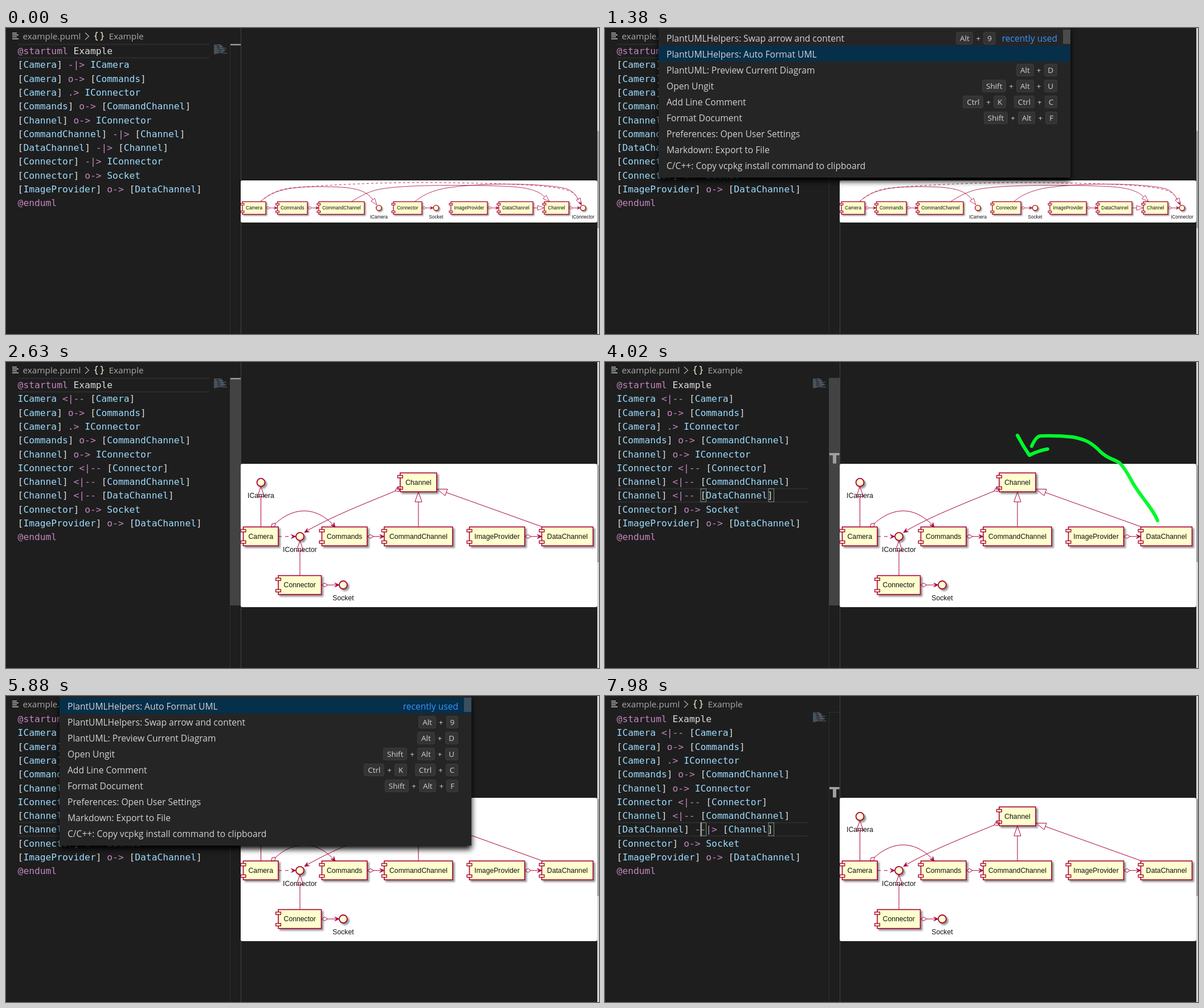
An HTML page for the animation above (8000 ms loop, 1041 by 538 pixels).

```html
<!DOCTYPE html>
<html lang="en">
<head>
<meta charset="utf-8">
<title>Component diagram editor</title>
<style>
  html, body { margin: 0; width: 100%; height: 100%; overflow: hidden; background: #1e1e1e; }
  #stage { position: absolute; left: 0; top: 0; width: 1041px; height: 538px; overflow: hidden; }
  svg { position: absolute; left: 0; top: 0; display: block; }
  .code text { font: 16.28px "DejaVu Sans Mono", monospace; white-space: pre; }
  .crumb { font: 15.3px "Open Sans", sans-serif; fill: #a9a9a9; }
  .label { font-family: "Liberation Sans", Arial, sans-serif; text-anchor: middle; fill: #111; }
  .wire { fill: none; stroke: #a80036; }
  .wire path { vector-effect: non-scaling-stroke; }
  .head { fill: #a80036; }
  .part { fill: #fefece; stroke: #a80036; }
  .tab { fill: #fefece; stroke: #a80036; }
  #flat .part { filter: drop-shadow(2.3px 2.3px 1.1px rgba(0,0,0,.42)); }
  #layered .part { filter: drop-shadow(3.4px 3.4px 1.6px rgba(0,0,0,.42)); }
  #palette { position: absolute; left: 94px; top: 0; width: 723px; height: 263px; background: #252526;
    box-shadow: 0 6px 10px #000; color: #d2d2d2; font: 15.6px "Open Sans", sans-serif; }
  .row { position: absolute; left: 0; width: 686px; height: 27.1px; padding: 1px 23px 0 14px;
    display: flex; align-items: center; white-space: nowrap; }
  .row.on { background: #062f4a; }
  .name { flex: 1; }
  .keys { display: flex; align-items: center; font-size: 13.5px; }
  .key { box-sizing: border-box; height: 22px; line-height: 20px; padding: 0 5.8px; border-radius: 4px;
    background: rgba(128,128,128,.17); border: 1px solid rgba(128,128,128,.1); }
  .plus { width: 18px; text-align: center; }
  .gap { width: 14px; }
  .recent { color: #3794ff; margin-left: 11px; }
  #thumb { position: absolute; left: 710px; top: 3px; width: 13px; height: 25px; background: rgba(121,121,121,.45); }
</style>
</head>
<body>
<div id="stage">
  <svg id="scene" width="1041" height="538" viewBox="0 0 1041 538"></svg>
  <div id="palette"></div>
</div>
<script>
const LOOP = 8000, LEFT = 20.6, TOP = 28.4, PITCH = 24.27, CHAR = 9.8;
const $ = id => document.getElementById(id);

// ---- source text ----
const before = [
  '@startuml Example', '[Camera] -|> ICamera', '[Camera] o-> [Commands]', '[Camera] .> IConnector',
  '[Commands] o-> [CommandChannel]', '[Channel] o-> IConnector', '[CommandChannel] -|> [Channel]',
  '[DataChannel] -|> [Channel]', '[Connector] -|> IConnector', '[Connector] o-> Socket',
  '[ImageProvider] o-> [DataChannel]', '@enduml'];
const sorted = before.slice();
sorted[1] = 'ICamera <|-- [Camera]';
sorted[6] = 'IConnector <|-- [Connector]';
sorted[7] = '[Channel] <|-- [CommandChannel]';
sorted[8] = '[Channel] <|-- [DataChannel]';
const swapped = sorted.slice();
swapped[8] = '[DataChannel] --|> [Channel]';

const escape = s => s.replace(/</g, '&lt;').replace(/>/g, '&gt;');
const tokens = line => [...line.matchAll(/(@\w+|o->|[-.<|>]+)|([\[\]])|(\w+)|\s+/g)].map(m => ({
  text: m[0], at: m.index,
  color: m[1] ? '#c586c0' : m[3] && m[0] !== 'Example' ? '#9cdcfe' : '#dcdcdc'
}));

function codeView(id, lines) {
  const rows = lines.map((line, i) => `<text x="${LEFT}" y="${46.2 + PITCH * i}">` +
    tokens(line).map(t => `<tspan fill="${t.color}">${escape(t.text)}</tspan>`).join('') + '</text>');
  const mini = lines.map((line, i) => tokens(line).filter(t => t.text.trim()).map(t =>
    `<rect x="${365 + t.at * .7}" y="${29 + i * 1.45}" width="${t.text.length * .7}" height="1" fill="${t.color}" opacity=".42"/>`
  ).join(''));
  return `<g id="${id}" class="code">${rows.join('')}${mini.join('')}</g>`;
}

// ---- diagram pieces, s is the zoom of the drawing ----
function kit(s, line) {
  const put = (x, y, deg, d, cls = '') =>
    `<path class="${cls}" d="${d}" stroke-width="${line}" transform="translate(${x} ${y}) rotate(${deg}) scale(${s})"/>`;
  const k = {
    text: (x, y, t) => `<text class="label" x="${x}" y="${y}" font-size="${14 * s}">${t}</text>`,
    head: (x, y, deg = 0) => put(x, y, deg, 'M0 0L-9-4L-5 0L-9 4Z', 'head'),
    tri: (x, y, deg = 0) => put(x, y, deg, 'M0 0L-20-7V7Z'),
    gem: (x, y, deg = 0) => put(x, y, deg, 'M0 0L6-4L12 0L6 4Z'),
    line: (d, dash = '') => `<path d="${d}" stroke-width="${line}" stroke-dasharray="${dash}"/>`,
    box(x, x2, y, name) {
      const h = 38 * s, w = 10 * s, t = 5 * s, sw = line * 1.6;
      const tab = ty => `<rect class="tab" x="${x - w / 2}" y="${ty}" width="${w}" height="${t}" stroke-width="${sw * .85}"/>`;
      return `<rect class="part" x="${x}" y="${y}" width="${x2 - x}" height="${h}" stroke-width="${sw}"/>` +
        tab(y + t) + tab(y + h - 2 * t) + k.text((x + x2) / 2, y + h / 2 + 4.9 * s, name);
    },
    port: (x, y, name) => `<circle class="part" cx="${x}" cy="${y}" r="${8 * s}" stroke-width="${line * 1.8}"/>` +
      k.text(x, y + 31.5 * s, name),
    link: (x, x2, y) => k.gem(x, y) + k.line(`M${x + 12 * s} ${y}H${x2 - 4 * s}`) + k.head(x2, y)
  };
  return k;
}

const sheet = (y, h) => `<rect x="412" y="${y}" width="626" height="${h}" rx="3" fill="#fff"/>`;

function flatDiagram() {
  const k = kit(.582, .8), y = 305.4, m = 316.3;
  const boxes = [[415, 456, 'Camera'], [476.5, 529, 'Commands'], [549, 629, 'CommandChannel'], [680, 730, 'Connector'],
    [781, 845, 'ImageProvider'], [865, 925, 'DataChannel'], [945, 988, 'Channel']];
  const links = [[456.5, 476], [529.5, 549], [730.5, 750], [845.5, 865], [988, 1008]];
  return sheet(268, 74) +
    boxes.map(b => k.box(b[0], b[1], y, b[2])).join('') +
    k.port(654.5, m, 'ICamera') + k.port(755, m, 'Socket') + k.port(1013, m, 'IConnector') +
    '<g class="wire">' + links.map(l => k.link(l[0], l[1], m)).join('') +
    k.line(`M925 ${m}H933.5`) + k.tri(945, m) +
    k.line('M447 305C470 284 500 279 550 279C600 279 630 281 644 302') + k.tri(651, 311, 53) +
    k.line('M447 305C465 289 480 284 502 281C630 271 720 271 800 272.5C900 274 980 277 997 291Q1003 297 1008 309', '4 4') +
    k.line('M607 305C625 294 640 285 665 282C720 274 860 276 900 280C925 283 938 289 945.5 297') + k.tri(954, 305, 43) +
    k.line('M718 305C735 290 760 282 790 279C850 272 950 273 985 283Q998 288 1004 300.5') + k.tri(1010, 311, 62) +
    k.head(1010, 311, 62) + '</g>';
}

function layeredDiagram() {
  const k = kit(.873, 1), m = 306.8;
  const boxes = [[692, 756, 195, 'Channel'], [416.5, 478, 290, 'Camera'], [554.5, 634, 290, 'Commands'],
    [664, 784, 290, 'CommandChannel'], [813.5, 910.5, 290, 'ImageProvider'], [940.5, 1030.5, 290, 'DataChannel'],
    [478, 553.5, 375.5, 'Connector']];
  const links = [[634.5, 664, m], [911, 940.5, m], [554, 585, 392]];
  return sheet(179, 252) +
    boxes.map(b => k.box(...b)).join('') +
    k.port(447.5, 211.7, 'ICamera') + k.port(516, m, 'IConnector') + k.port(592, 392, 'Socket') +
    '<g class="wire">' + links.map(l => k.link(...l)).join('') +
    k.tri(447.5, 219, -90) + k.line('M447.5 236.5V290') +
    k.tri(516, 314.5, -90) + k.line('M516 332V375') +
    k.tri(724, 228.5, -90) + k.line('M724 246V290') +
    k.tri(756.5, 223.5, 199.5) + k.line('M773 229.4L942 290') +
    k.line(`M478 ${m}H503`, '6 6') + k.head(508.5, m) +
    k.gem(465.5, 290.5, -42) + k.line('M473.5 283.5C505 255 543 253 575 287') + k.head(578, 290.5, 50) +
    k.gem(692.5, 222, 152) + k.line('M683 227C630 249 575 270 528 297') + k.head(524, 299.5, 150) + '</g>';
}

// ---- static scene ----
const frameLines = y => `<path d="M21 ${y}H357M21 ${y + 23.6}H357" stroke="#2c2c2c" stroke-width="2"/>`;
const charBox = x => `<rect x="${x}" y="222.8" width="9.6" height="23" fill="rgba(0,100,0,.1)" stroke="#888"/>`;
$('scene').innerHTML = `
  <defs><clipPath id="pane"><rect x="412" y="0" width="626" height="538"/></clipPath></defs>
  <rect width="1041" height="538" fill="#1e1e1e"/>
  <path d="M11 9H19M11 12.3H22M11 15.6H19M11 18.9H22" stroke="#c5c5c5" stroke-width="1.5"/>
  <text class="crumb" x="29.5" y="20.3">example.puml</text>
  <path d="M139 8.5L145.5 14.5L139 20.5" fill="none" stroke="#a9a9a9" stroke-width="1.3"/>
  <path d="M161 7.5Q158 7.5 158 10V12.5Q158 14.5 155.5 14.5Q158 14.5 158 16.5V19Q158 21.5 161 21.5M166 7.5Q169 7.5 169 10V12.5Q169 14.5 171.5 14.5Q169 14.5 169 16.5V19Q169 21.5 166 21.5" fill="none" stroke="#e8d9c0" stroke-width="1.5"/>
  <text id="crumb" class="crumb" x="180.5" y="20.3">Example</text>
  <g id="topLine">${frameLines(TOP + .4)}</g>
  <g id="lowLine">${frameLines(TOP + PITCH * 8 + .2)}${charBox(168)}${charBox(287)}</g>
  ${codeView('before', before)}${codeView('sorted', sorted)}${codeView('swapped', swapped)}
  <rect id="caret" width="2" height="24" fill="#aeafad"/>
  <path d="M393.5 28V538M393.5 28.5H412" stroke="#303030" fill="none"/>
  <rect id="bar" x="393" y="28" width="19" height="400" fill="#434343"/>
  <rect id="topMark" x="394" y="28" width="18" height="2.5" fill="#999"/>
  <path id="lowMark" d="M394 160H411.5V164H406V178.5H400V164H394Z" fill="#a0a0a0"/>
  <path d="M412.5 0V538" stroke="#444"/>
  <g clip-path="url(#pane)"><g id="flat">${flatDiagram()}</g><g id="layered">${layeredDiagram()}</g></g>
  <rect x="1038" width="3" height="538" fill="#d6d6d6"/>
  <rect x="1038" y="181" width="3" height="171" fill="#a0a0a0"/>
  <path id="arrow" d="M970 279C962 257 938 235 924 208C916 193 910 184 903 177C890 169 884 171 870 158C852 139 840 136 822 132Q795 129 765 130Q757 130 749 148M724 129Q734 148 745 164Q760 156 777 153" fill="none" stroke="#00f92b" stroke-width="6" stroke-linecap="round" stroke-linejoin="round"/>`;

// ---- command list ----
const format = ['PlantUMLHelpers: Auto Format UML', ''];
const swap = ['PlantUMLHelpers: Swap arrow and content', 'Alt+9'];
const others = [['PlantUML: Preview Current Diagram', 'Alt+D'], ['Open Ungit', 'Shift+Alt+U'],
  ['Add Line Comment', 'Ctrl+K Ctrl+C'], ['Format Document', 'Shift+Alt+F'], ['Preferences: Open User Settings', ''],
  ['Markdown: Export to File', ''], ['C/C++: Copy vcpkg install command to clipboard', '']];
const chord = c => c.split('+').map(k => `<span class="key">${k}</span>`).join('<span class="plus">+</span>');
const keys = s => s ? `<span class="keys">${s.split(' ').map(chord).join('<span class="gap"></span>')}</span>` : '';

let shown = '';
function fillPalette(first, pick) {
  if (shown === first[0] + pick) return;
  shown = first[0] + pick;
  const list = [first, first === swap ? format : swap, ...others];
  $('palette').innerHTML = list.map((r, i) =>
    `<div class="row${i === pick ? ' on' : ''}" style="top:${3 + 28.1 * i}px"><span class="name">${r[0]}</span>${keys(r[1])}` +
    (i ? '' : '<span class="recent">recently used</span>') + '</div>').join('') + '<div id="thumb"></div>';
}

// ---- timeline ----
const show = (id, on) => { $(id).style.display = on ? '' : 'none'; };
const blinks = [[1930, 2390], [2940, 3400], [3560, 4020], [4490, 5030], [5490, 5730], [7980, 8000]];

function draw(t) {
  const within = (a, b) => t >= a && t < b;
  const low = t >= 3480;
  show('before', t < 1930);
  show('sorted', within(1930, 7980));
  show('swapped', t >= 7980);
  show('flat', t < 2630);
  show('layered', t >= 2630);
  show('topLine', !low);
  show('topMark', !low);
  show('lowLine', low);
  show('lowMark', low);
  show('bar', within(70, 840) || within(1840, 5490));
  show('arrow', within(3560, 5490));
  show('caret', blinks.some(b => within(...b)));
  $('caret').setAttribute('x', LEFT + CHAR * (low ? 15 : 17) + (low ? .2 : 1));
  $('caret').setAttribute('y', TOP + (low ? PITCH * 8 : 0));
  $('crumb').style.fill = within(4580, 4720) ? '#e0e0e0' : '#a9a9a9';
  show('palette', within(540, 1840) || within(5730, 7900));
  if (t < 4000) fillPalette(swap, t < 1380 ? 0 : 1);
  else fillPalette(format, t < 7350 ? 0 : 1);
}

const start = performance.now();
function tick() {
  draw((performance.now() - start) % LOOP);
  requestAnimationFrame(tick);
}
draw(0);
requestAnimationFrame(tick);
</script>
</body>
</html>
```
